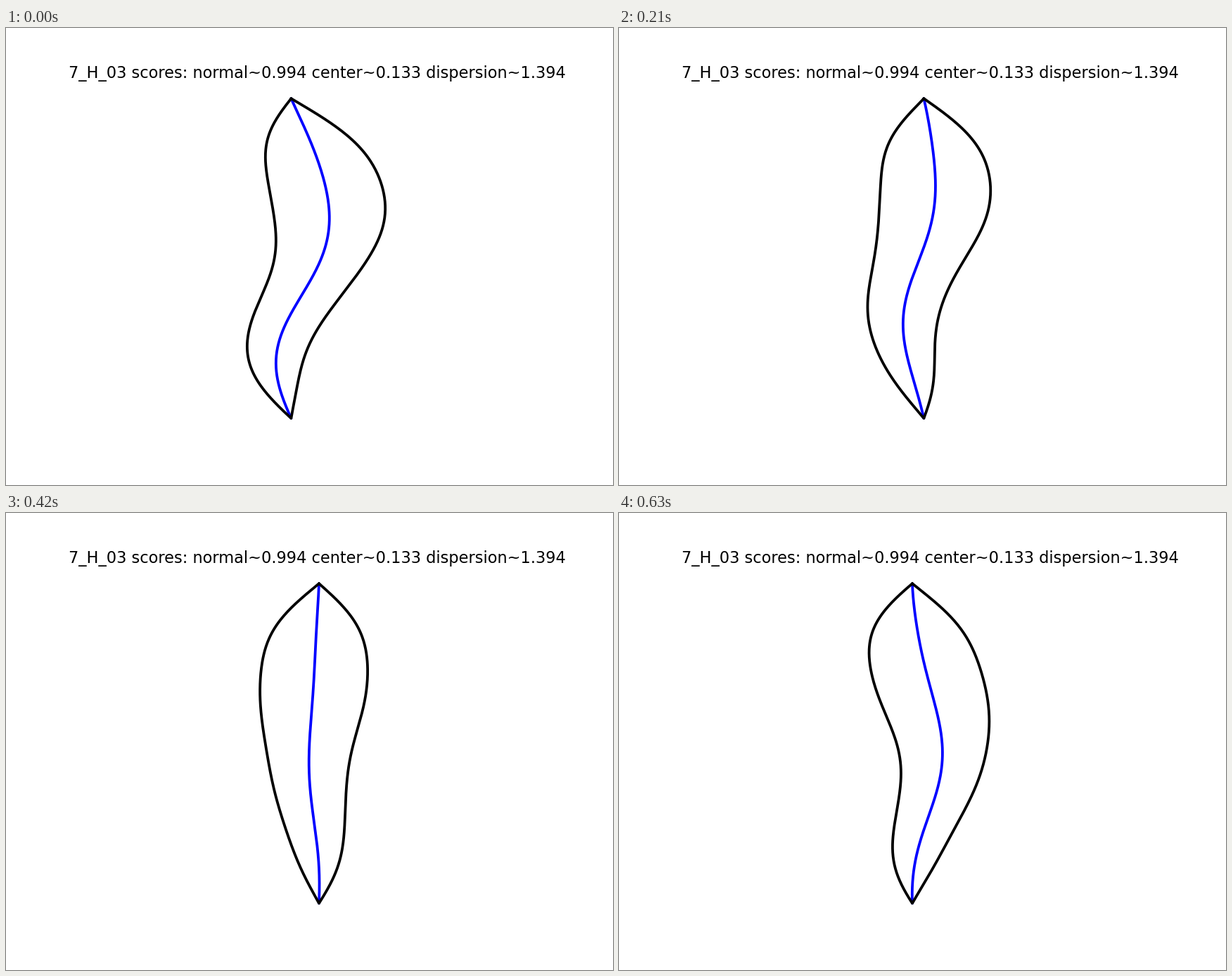
Animation of 863 by 649 pixels, one loop 0.7 s. Source, as a matplotlib script:

```python
import numpy as np
import matplotlib.pyplot as plt
from matplotlib.animation import FuncAnimation

W, H, DPI = 863, 649, 64
TOP, BOTTOM = 100.2, 554.3
FRAMES, INTERVAL = 10, 70
PT = 72 / DPI  # points per pixel

u = np.linspace(0, 1, 240)  # position along the body, top to bottom
ys = TOP + (BOTTOM - TOP) * u

# Leaf profile: a sine series that vanishes at both tips
half_width = sum(a * np.sin(k * np.pi * u)
                 for k, a in enumerate((76.5, 17, 13, 1.5, 2.2, 0.6, 0.7), 1))


def sway(n, mid, cos, sin, drift=0):
    """Oscillate about mid, one cycle every four steps, with a slow drift."""
    turn = np.pi / 2 * n
    return (mid + cos * np.cos(turn) + sin * np.sin(turn)
            + drift * n * np.sin(turn) ** 2)


def midline_x(n):
    """Two waves along the body whose strengths sway in time."""
    wave = 2 * np.pi * u
    return (sway(n, 431, -7.4, 3, 0.3)
            + sway(n, -7.3, -14.1, -11.2, -0.3) * np.cos(wave)
            + sway(n, 15.6, 15.3, -9.3, -0.85) * np.sin(wave)
            + sway(n, 1.5, 1.7, 0) * np.cos(2 * wave)
            + sway(n, -0.4, 1.2, 2.4) * np.sin(2 * wave))


fig = plt.figure(figsize=(W / DPI, H / DPI), dpi=DPI, facecolor="white")
ax = fig.add_axes([0, 0, 1, 1])
ax.set(xlim=(0, W), ylim=(H, 0))
ax.axis("off")

ax.text(442.3, 71.5, "7_H_03 scores: normal~0.994 center~0.133 dispersion~1.394",
        family="DejaVu Sans", size=22.55 * PT, ha="center", va="baseline")

style = dict(lw=3.8 * PT, solid_joinstyle="round", solid_capstyle="round")
midline, = ax.plot([], [], color="#0000ff", **style)
outline, = ax.plot([], [], color="black", **style)


def update(n):
    x = midline_x(n)
    spread = half_width * sway(n, 0.995, 0.03, 0)
    midline.set_data(x, ys)
    outline.set_data(np.r_[x - spread, (x + spread)[::-1]], np.r_[ys, ys[::-1]])
    return midline, outline


anim = FuncAnimation(fig, update, frames=FRAMES, interval=INTERVAL,
                     repeat=True, repeat_delay=0)
plt.show()
```
